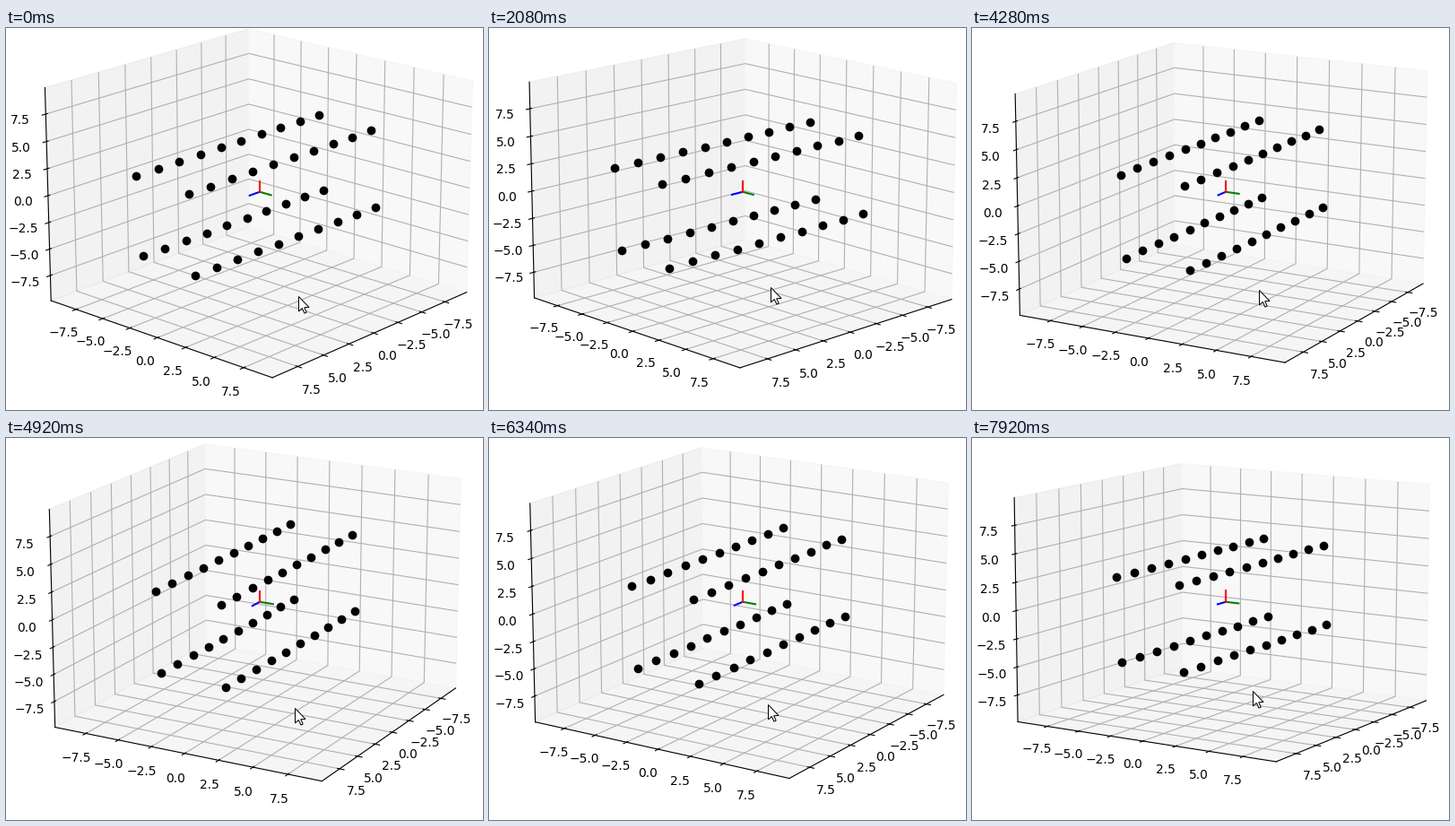
These frames come from a looping animation (532 px wide and 426 px high, 8 s). A matplotlib script:

```python
import itertools

import matplotlib.pyplot as plt
import numpy as np
from matplotlib.animation import FuncAnimation
from matplotlib.patches import Polygon
from matplotlib.transforms import Affine2D

W, H, DPI = 532, 426, 100
FRAMES, INTERVAL = 100, 80
CENTER = (283.0, 182.75)     # where the data origin lands, from the top left
SIDE = 517.4                 # side of the square 3D axes in pixels
LIMIT = 9.896
PX_PER_DEG = SIDE / 180      # mouse drag needed for one degree of rotation

# turning points of the hand-dragged view: (frame, degrees)
AZIM = [(0, 41.8), (26, 45.7), (43, 28.7), (56, 30), (68, 27.3),
        (76, 34), (89, 27), (99, 32.2)]
ELEV = [(0, 18.7), (26, 15.3), (39, 19.65), (53, 14.4), (61, 17.5),
        (68, 11.65), (83, 16.9), (99, 10.7)]
# the mouse lets go and grabs again once: (frame, anchor in pixels)
GRAB_X = [(40, 446.8), (46, 406.8)]
GRAB_Y = [(40, 245.3), (46, 251)]


def eased(i, keys):
    """Swing between the keys with a cosine ease, holding at both ends."""
    frames, values = zip(*keys)
    k = np.interp(i, frames, range(len(keys)))
    n = min(int(k), len(keys) - 2)
    u = (1 - np.cos(np.pi * (k - n))) / 2
    return values[n] + (values[n + 1] - values[n]) * u


fig = plt.figure(figsize=(W / DPI, H / DPI), dpi=DPI, facecolor="white")
offset = SIDE * 95 / 185     # the 3D view is slightly off the axes centre
ax = fig.add_axes([(CENTER[0] - offset) / W, (H - CENTER[1] - offset) / H,
                   SIDE / W, SIDE / H], projection="3d")
span = (-LIMIT, LIMIT)
ticks = np.arange(-7.5, 8, 2.5)
ax.set(xlim=span, ylim=span, zlim=span,
       xticks=ticks, yticks=ticks, zticks=ticks)

# four slightly sheared rows of ten points
points = np.array([(x + 0.084 * y + 0.073 * z, y, z)
                   for x, y, z in itertools.product(np.arange(-9, 10, 2),
                                                    (-2.5, 2.5), (-3.75, 3.75))])
ax.plot(*points.T, "ko", markersize=6)

for axis, color in zip(np.eye(3), "bgr"):
    ax.plot(*np.column_stack([np.zeros(3), axis]), color=color, linewidth=1.5)

arrow = np.array([(0, 0), (0, 16.5), (3.8, 13), (6.4, 18.6), (8.7, 17.6),
                  (6.2, 12.2), (11.5, 12)])
pointer = Polygon(arrow, closed=True, facecolor="white", edgecolor="black",
                  linewidth=0.72, zorder=10,
                  transform=Affine2D().scale(1, -1).translate(0, H))
fig.add_artist(pointer)


def update(i):
    azim, elev = eased(i, AZIM), eased(i, ELEV)
    ax.view_init(elev=elev, azim=azim)
    tip = np.round([eased(i, GRAB_X) - azim * PX_PER_DEG,
                    eased(i, GRAB_Y) + elev * PX_PER_DEG])
    pointer.set_xy(arrow + tip + (-0.5, 0.5))
    return ()


anim = FuncAnimation(fig, update, frames=FRAMES, interval=INTERVAL,
                     init_func=lambda: update(0), repeat=True, repeat_delay=0)
plt.show()
```
